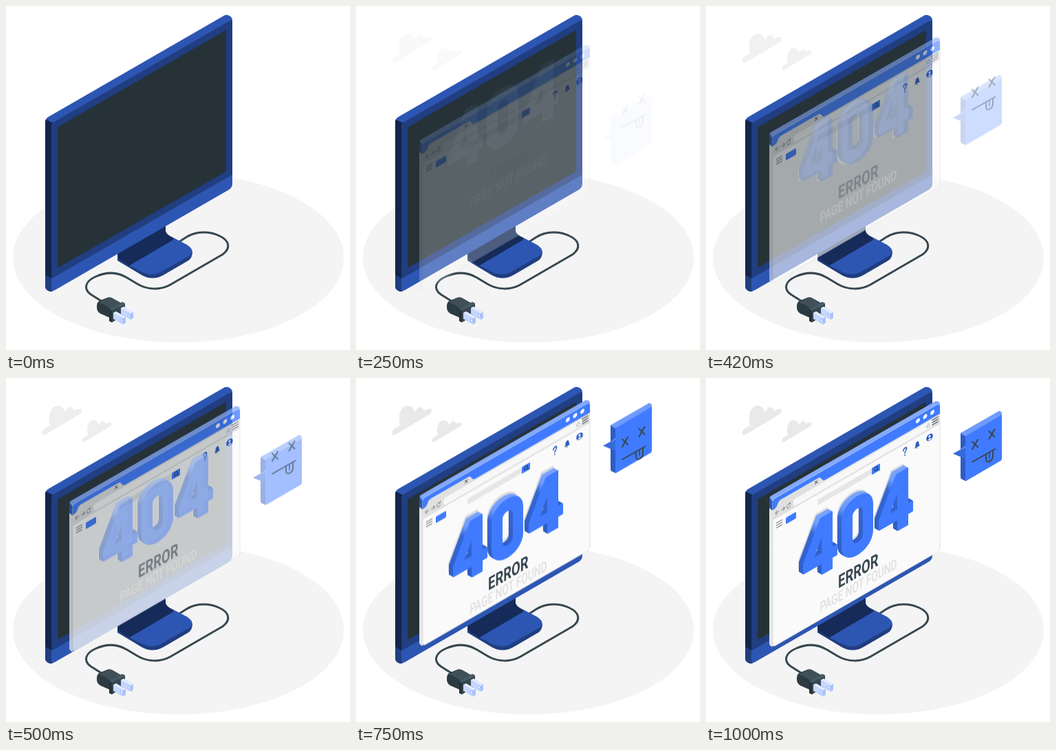
Recreate the animation shown at these times as an HTML page without scripts. Size 500 px wide and 500 px high, loop 1040 ms.

```html
<!DOCTYPE html>
<html lang="en">
<head>
<meta charset="utf-8">
<title>404</title>
<style>
  html, body { margin: 0; width: 100%; height: 100%; overflow: hidden; background: #fff; }
  svg { display: block; width: 100vw; height: 100vh; }

  .rise { animation: rise 1.04s -.008s cubic-bezier(.36, -.01, .5, 1.38) infinite; }
  .block { animation: block 1.04s linear infinite; }

  /* the end of each loop holds the finished pose */
  @keyframes rise {
    0% { opacity: 0; transform: translateY(var(--from)); }
    96.15%, 100% { opacity: 1; transform: translateY(0); }
  }
  @keyframes block {
    0% { opacity: 0; transform: translateY(100px); }
    20.2% { opacity: .01; transform: translateY(88px); }
    31.7% { opacity: .08; transform: translateY(69px); }
    40.4% { opacity: .26; transform: translateY(52.5px); }
    48.1% { opacity: .48; transform: translateY(35px); }
    55.8% { opacity: .73; transform: translateY(15.5px); }
    63.5% { opacity: .92; transform: translateY(0); }
    72.1% { opacity: 1; transform: translateY(-11.5px); }
    80.8% { transform: translateY(-14px); }
    88.5% { transform: translateY(-8px); }
    96.15%, 100% { opacity: 1; transform: translateY(0); }
  }

  .window { --from: 30px; }
  .copy { --from: -62px; }
  .digits { --from: -16px; }
  .face { --from: 72px; }
  .fade { --from: 0px; }

  .line { fill: none; stroke-linecap: round; stroke-linejoin: round; }
  text { font-family: Roboto, "Liberation Sans", sans-serif; }
</style>
</head>
<body>
<svg viewBox="0 0 500 500" xmlns="http://www.w3.org/2000/svg">
  <defs>
    <linearGradient id="side" x1="0" y1="0" x2="0" y2="1">
      <stop offset="0" stop-color="#7aa3ff"/>
      <stop offset=".1" stop-color="#6f9bfc"/>
      <stop offset=".24" stop-color="#3567d6"/>
      <stop offset="1" stop-color="#2d5cc4"/>
    </linearGradient>
    <path id="cloud" d="M53 82Q51 77 57 73L64 69Q60 52 68 43Q76 37 83 44Q86 50 87 48Q92 39 97 44Q100 48 99 48Q104 44 109 45Q111 48 108 52L58 82Q54 84 53 82Z"/>
    <path id="four" fill-rule="evenodd" d="M25 218H42Q43 218 43 219V270H49Q50 270 50 271V285Q50 286 49 286H43V301Q43 302 42 302H28Q27 302 27 301V286H1Q0 286 0 285V271ZM27 270V247L16.500 270Z"/>
    <path id="zero" fill-rule="evenodd" d="M56 241C56 209 102 209 102 241V279C102 311 56 311 56 279ZM72 243C72 233 87 233 87 243V277C87 287 72 287 72 277Z"/>
    <g id="num" transform="matrix(1 -.577 0 1 141 0)">
      <use href="#four"/>
      <use href="#zero"/>
      <use href="#four" x="110"/>
    </g>
    <path id="cross" class="line" d="M-4 -4L4 4M4 -7L-4 7"/>
    <path id="menu" class="line" d="M-4 -3.5H4M-4 0H4M-4 3.5H4"/>
    <g id="prong">
      <path d="M0 0L4 -2L18 6V14.500L14 17L0 8.500Z" fill="#a9c2fb"/>
      <path d="M4 -2L18 6L14 8L0 0Z" fill="#e3ebff"/>
      <path d="M0 0L14 8V17L0 8.500Z" fill="#c5d6ff"/>
      <ellipse cx="12" cy="11" rx="1.700" ry="2.200" fill="#f2f5ff" stroke="#8ba8ec" stroke-width=".8"/>
    </g>
  </defs>

  <ellipse cx="250.5" cy="366" rx="240.5" ry="123.2" fill="#f4f4f4"/>

  <g class="rise fade" fill="#e9e9e9">
    <use href="#cloud"/>
    <use href="#cloud" transform="matrix(.75 0 0 .75 71 31)"/>
  </g>

  <!-- cable and plug -->
  <path class="line" stroke="#37474f" stroke-width="3" d="M248 345L262 336C276 327 296 327 310 334C325 341 327 352 315 361L239 405C225 413 206 413 191 404L176 395C163 387 147 386 131 393C115 400 112 411 123 419L142 431"/>
  <path fill="#2c3a41" d="M132 436Q132 430 137 428L147 424Q152 422 157 426L167 432L153 454L137 447Q132 444 132 438Z"/>
  <path fill="#415058" d="M135 431Q140 427 148 424.500Q152 423 157 426L167 431.500L152 441Q146 434 135 431Z"/>
  <path fill="#455a64" d="M150 441L169 430L173 432L154 443Z"/>
  <path fill="#263238" d="M150 441L154 443V460L150 458Z"/>
  <path fill="#37474f" d="M154 443L173 432V448L154 460Z"/>
  <use href="#prong" x="167" y="439"/>
  <use href="#prong" x="156" y="446"/>

  <!-- stand -->
  <path fill="#203e80" d="M162 361V370L197 391Q213 400 229 391L265 370Q271 366 271 357L240 338Z"/>
  <path fill="#2d56b3" d="M179 377L240 341V335L263 347Q272 353 270.500 358Q269 362 263 365L226 386Q213 393 200 387.500Z"/>
  <path fill="#162b59" d="M162 360L200 320H232V327Q233 331 238 334L243 337.500Q244 339 242 340.500L179 377.500L164 368Z"/>

  <!-- monitor -->
  <path fill="#2d56b3" d="M57 169Q57 164 61 161.500L316 14.500Q321 11.500 326 15Q329 17 329 21V258Q329 264 324 267L71 413Q64 416.500 60 413Q57 411 57 407Z"/>
  <path fill="#13254d" d="M57 169Q57 166 58 165L68 170Q66 172 66 175V396L57 391Z"/>
  <path fill="#203e80" d="M57 391L66 396V411Q66 414 68 414.500Q63 416 60 413Q57 411 57 407Z"/>
  <path fill="#203e80" d="M66 175Q66 171 69 169L325 21.500Q329 19.500 329 24V245L66 396.500Z"/>
  <path fill="#263238" d="M75 178Q75 176 77 175L318 36Q320 35 320 37V238Q320 240 318 241.500L77 379.500Q75 380.500 75 378Z"/>

  <!-- browser window -->
  <g class="rise window">
    <path fill="#e6e6e6" d="M92 176L97 180V391L94 389.500Q92 388 92 386Z"/>
    <path fill="#2d56b3" d="M92 189V175Q92 173 94 172.500L99 178L97 193Z"/>
    <path fill="#83a9fb" d="M92.500 173.500Q93 172 95 171L333 34Q336 32.500 339 35Q340 36 340 39L336 42L97 180Z"/>
    <g transform="matrix(1 -.577 0 1 97 177)">
      <rect width="243" height="214" rx="4" fill="#fafafa" stroke="#dedede" stroke-width=".9"/>
      <path fill="#407bff" d="M0 17V4Q0 0 4 0H239Q243 0 243 4V17Z"/>
      <path fill="#e0e0e0" d="M0 15H2C8 15 6 6.500 12 6.500H66C72 6.500 70 15 77 15H243V30H0Z"/>
      <rect x="30" y="17" width="202" height="10.500" rx="4" fill="#f7f7f7"/>
      <g fill="#fff">
        <circle cx="211" cy="6.800" r="3"/>
        <circle cx="221.500" cy="6.800" r="3"/>
        <circle cx="232" cy="6.800" r="3"/>
      </g>
      <g class="line" stroke="#8a8a8a" stroke-width="1">
        <path d="M9 22H4M6 19.500L4 22L6 24.500M12.500 22H17.500M15.500 19.500L17.500 22L15.500 24.500M25 20A2.600 3 0 1 0 25.500 23.500M25.500 18V20.500H23.500"/>
        <path stroke="#555" d="M61.500 9L65 13M65 9L61.500 13"/>
        <path stroke="#c4c4c4" d="M226 19L227 21.500H229L227.500 23L228 25.500L226 24L224 25.500L224.500 23L223 21.500H225Z"/>
      </g>
      <use href="#menu" x="236" y="21.500" stroke="#666" stroke-width="1.500"/>
      <use href="#menu" x="9.500" y="40.500" stroke="#8f8f8f" stroke-width="1.500"/>
      <rect x="19" y="37" width="15" height="9.500" rx="1.500" fill="#407bff"/>
      <rect x="65" y="37.500" width="80" height="8.500" fill="#e6e6e6"/>
      <rect x="144" y="37" width="12" height="10" rx="1" fill="#407bff"/>
      <path class="line" stroke="#263238" stroke-width="1" d="M152 43L153.500 45M152.500 41.500A2.300 2.500 0 1 1 147.900 41.500A2.300 2.500 0 1 1 152.500 41.500"/>
      <path class="line" stroke="#2d5cc4" stroke-width="1.800" d="M190 38.500C190 34.500 194.500 34.500 194.500 38C194.500 40.500 192 40.500 192 43M192 46V46.200"/>
      <path fill="#2d5cc4" d="M206 44.500Q207.500 43 207.500 40Q207.500 36.500 210 36.500Q212.500 36.500 212.500 40Q212.500 43 214 44.500ZM208.800 45.500H211.200L210 47Z"/>
      <circle cx="228" cy="40.800" r="4.800" fill="#2d5cc4"/>
      <path fill="#fff" d="M228 37.500A1.600 1.800 0 1 1 227.900 37.500M225 43.500Q228 40.500 231 43.500Q228 46 225 43.500Z"/>
    </g>
  </g>

  <!-- message: nested groups multiply their opacities -->
  <g class="rise fade">
    <g class="rise copy">
      <use href="#num" x="-7" y="-6" fill="#dcdcdc"/>
      <text transform="matrix(.71 -.41 0 1 192 306)" font-size="26" font-weight="700" fill="#37474f">ERROR</text>
      <text transform="matrix(.655 -.378 0 1 165.500 341)" font-size="21" font-weight="500" fill="#e0e0e0">PAGE NOT FOUND</text>
      <g class="rise digits">
        <g fill="url(#side)">
          <use href="#num" x="-6" y="-3.500"/>
          <use href="#num" x="-5" y="-2.900"/>
          <use href="#num" x="-4" y="-2.300"/>
          <use href="#num" x="-3" y="-1.700"/>
          <use href="#num" x="-2" y="-1.200"/>
          <use href="#num" x="-1" y="-.600"/>
        </g>
        <use href="#num" fill="#407bff"/>
      </g>
    </g>
  </g>

  <!-- speech block -->
  <g class="block">
    <path fill="#2d5cc4" d="M370 80L378 84V150L371.500 147Q370 146 370 144Z"/>
    <path fill="#6f9bfc" d="M359 110L371 103L377 99V106Z"/>
    <path fill="#356ad9" d="M359 110L377 101V117.500Z"/>
    <path fill="#6f9bfc" d="M370 80L424 49Q426 47.500 428 48.500Q430 49.500 430 52L430 55L377 85Z"/>
    <path fill="#407bff" d="M377 84.500L428 54.500Q430 53.500 430 55V117Q430 119 428 120.500L379 149Q377 150 377 149Z"/>
  </g>
  <g class="rise fade">
    <g class="rise face" stroke="#37474f" stroke-width="2">
      <use href="#cross" x="391" y="96.500"/>
      <use href="#cross" x="415.500" y="81.500"/>
      <path class="line" d="M387 122L420.500 103M407 111V118.500C407 125 417 120.500 417 113.500V105.500"/>
      <path class="line" stroke-width="1.500" d="M412 108.500V116.500"/>
    </g>
  </g>
</svg>
</body>
</html>
```
